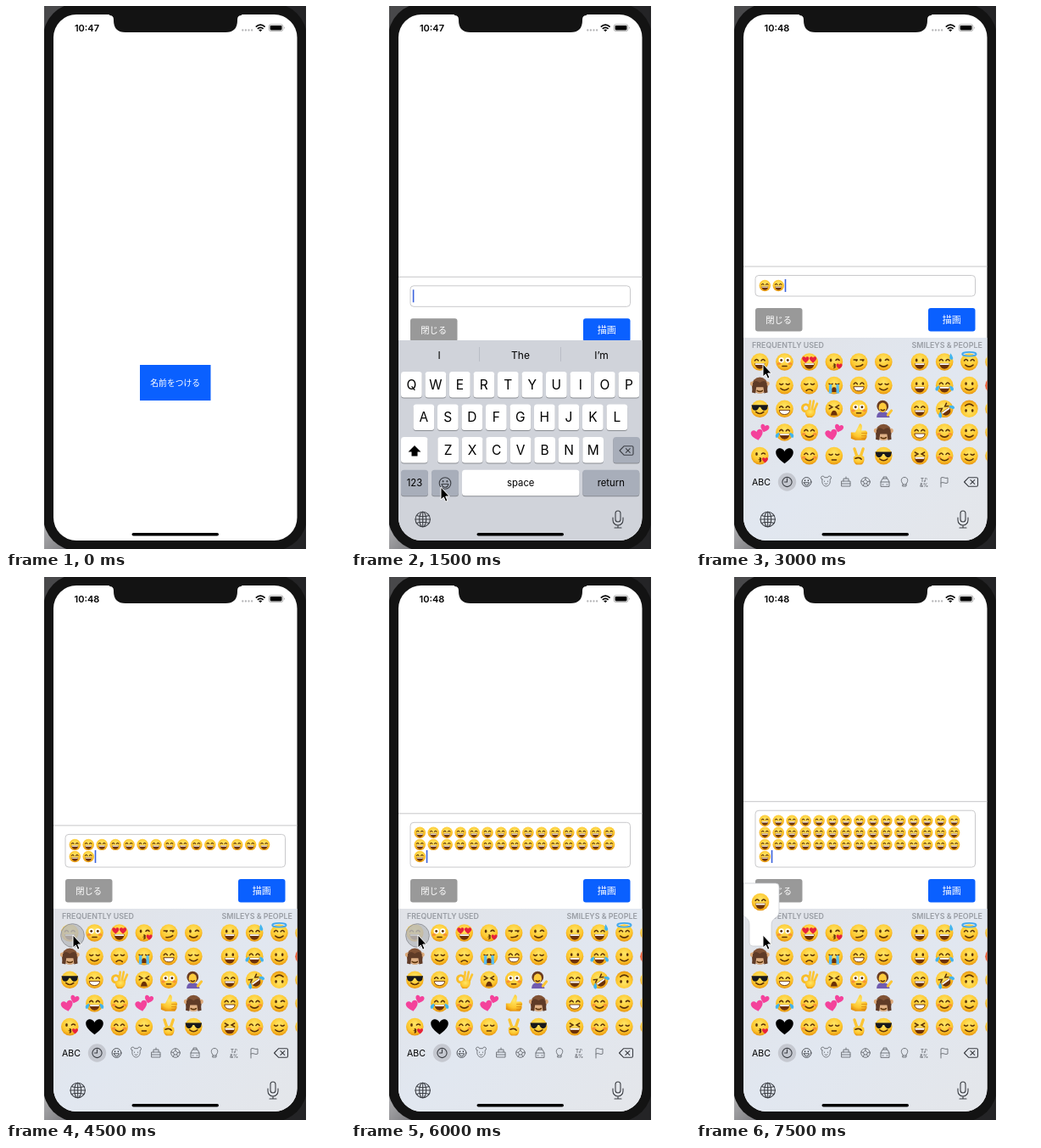
Write an HTML page that moves like this. It is 400 by 640 pixels and loops after 8000 ms.

```html
<!DOCTYPE html>
<html lang="ja">
<head>
<meta charset="utf-8">
<title>Emoji keyboard</title>
<style>
html, body { margin: 0; width: 100%; height: 100%; overflow: hidden; background: #fff; }
svg { display: block; width: 400px; height: 640px; }
text { font-family: Inter, "Noto Sans", sans-serif; text-anchor: middle; }
.jp { font-family: "Noto Sans CJK JP", "Noto Sans CJK", sans-serif; font-weight: 300; fill: #fff; }
.head { font-size: 8.9px; font-weight: 600; fill: #999da4; text-anchor: start; }
.line { fill: none; stroke: #3b3e44; stroke-linecap: round; stroke-linejoin: round; }
.eye { fill: #5b3208; }
.ink { fill: none; stroke: #5b3208; stroke-width: 1.5; stroke-linecap: round; }
</style>
</head>
<body>
<svg viewBox="0 0 400 640">
  <defs>
    <radialGradient id="skin" cx=".5" cy=".35" r=".68">
      <stop offset="0" stop-color="#ffe667"/><stop offset=".65" stop-color="#fdc62d"/><stop offset="1" stop-color="#e58f0c"/>
    </radialGradient>
    <linearGradient id="corner" x2="1" y2="1">
      <stop offset="0" stop-color="#b4b4b6"/><stop offset="1" stop-color="#77777b"/>
    </linearGradient>
    <linearGradient id="tray" x2="1" y2="1">
      <stop offset="0" stop-color="#e0e2e7"/><stop offset=".5" stop-color="#e1e7f0"/><stop offset="1" stop-color="#e4e6ea"/>
    </linearGradient>
    <clipPath id="screen"><rect x="56" y="10" width="287.5" height="620" rx="27"/></clipPath>
    <clipPath id="case"><rect x="45" width="309" height="640"/></clipPath>
    <g id="globe" class="line" stroke-width="1.1">
      <circle r="8.7"/><ellipse rx="4" ry="8.7"/><path d="M-8.7 0H8.7M0-8.7V8.7M-7.3-4.6Q0-1.8 7.3-4.6M-7.3 4.6Q0 1.8 7.3 4.6"/>
    </g>
    <g id="mic" class="line" stroke-width="1.1">
      <rect x="-3" y="-10" width="6" height="13" rx="3"/><path d="M-6-2V1A6 6 0 0 0 6 1V-2M0 7V10M-4 10H4"/>
    </g>
    <g id="erase" class="line" stroke-width="1.1">
      <path d="M-8 0L-3-5.2H6.5Q8-5.2 8-3.7V3.7Q8 5.2 6.5 5.2H-3ZM-.6-2.4L4.2 2.4M4.2-2.4L-.6 2.4"/>
    </g>
    <g id="smiley" class="line" stroke-width="1.1">
      <circle r="6.8"/><path d="M-4 1H4Q3 4.8 0 4.8T-4 1Z"/><path stroke-width="1.9" d="M-2.4-2.5v.6M2.4-2.5v.6"/>
    </g>
    <path id="heart" d="M0 9C-5 5-10 1-10-4-10-9-3-11 0-5 3-11 10-9 10-4 10 1 5 5 0 9Z"/>
    <g id="emojis"></g>
  </defs>

  <rect width="400" height="640" fill="#fff"/>
  <g clip-path="url(#case)">
    <rect x="45" width="309" height="640" fill="#242426"/>
    <rect x="45" width="30" height="40" fill="#48484a"/>
    <rect x="45" y="605" width="30" height="35" fill="url(#corner)"/>
    <rect x="44" y="-3" width="311" height="645" rx="40" fill="#131313"/>
  </g>
  <g clip-path="url(#screen)">
    <rect x="56" y="10" width="288" height="620" fill="#fff"/>
    <g id="start">
      <rect x="158" y="423" width="83.5" height="42" fill="#0a60ff"/>
      <text class="jp" x="199.7" y="447.6" font-size="9.8">名前をつける</text>
    </g>
    <g id="panel">
      <path id="rule" d="M56 0H344" stroke="#c6c6c8"/>
      <rect id="field" x="70" width="259.5" rx="4" fill="#fff" stroke="#c9c9cb"/>
      <g id="typed"></g>
      <rect id="caret" width="1.6" height="15" fill="#3a62dc"/>
      <g id="actions">
        <rect x="70" y="356" width="55.5" height="27.5" rx="3" fill="#999"/>
        <text class="jp" x="97.7" y="373.5" font-size="10.3">閉じる</text>
        <rect x="274" y="356" width="55.5" height="27.5" rx="3" fill="#0a60ff"/>
        <text class="jp" x="301.7" y="374" font-size="11">描画</text>
      </g>
    </g>
    <g id="letters">
      <rect x="56" y="394" width="288" height="236" fill="#d0d3da"/>
      <path d="M151.5 402V419M247.5 402V419" stroke="#b9bdc6"/>
      <g font-size="12"><text x="104" y="416">I</text><text x="200" y="416">The</text><text x="295.5" y="416">I’m</text></g>
      <g id="keys"></g>
      <path d="M75 518L82.5 525.5H78.5V530.5H71.5V525.5H67.5Z"/>
      <use href="#erase" x="325" y="524"/>
      <use href="#smiley" x="111" y="562.5"/>
    </g>
    <g id="emojiBoard">
      <rect x="56" y="391" width="288" height="239" fill="url(#tray)"/>
      <text class="head" x="66" y="403">FREQUENTLY USED</text>
      <text class="head" x="254.5" y="403">SMILEYS &amp; PEOPLE</text>
      <g id="grid"></g>
      <text x="77" y="564.5" font-size="10.6">ABC</text>
      <circle cx="107.5" cy="561" r="10.7" fill="#c5c8d0"/>
      <g class="line" stroke-width="1.1"><circle cx="107.5" cy="561" r="5.6"/><path d="M107.5 557V561H104.5"/></g>
      <g class="line" stroke-width=".9" style="stroke:#686b72">
        <use href="#smiley" transform="translate(130.5 561)scale(.8)"/>
        <path d="M149 558a2 2 0 1 1 2.5-2.3h4a2 2 0 1 1 2.5 2.3c1 4-1 8-4.500 8s-5.500-4-4.500-8M151.500 560v.5M155.500 560v.5M152 563q1.500 1 3 0"/>
        <path d="M172 566H182V560H172ZM172 563H182M174 560V557H180V560M177 557V555"/>
        <circle cx="200" cy="561" r="5.300"/><path d="M200 558.500L202.500 560.500 201.500 563H198.500L197.500 560.500ZM200 556V558.500M205 560L202.500 560.500M203 565.500L201.500 563M197 565.500L198.500 563M195 560L197.500 560.500"/>
        <path d="M218 566V561L220 557H226L228 561V566ZM218 561H228M220 564H221M225 564H226M221 557V555H225V557"/>
        <path d="M244 563C241 560 242 555.500 246 555.500S251 560 248 563V566H244ZM244 564H248"/>
        <path d="M289 567V556Q291 555 293 556T297 556V562Q295 563 293 562T289 562"/>
      </g>
      <g font-size="6" font-weight="600" fill="#686b72"><text x="269" y="560.500">T♪</text><text x="269" y="566.500">&amp;%</text></g>
      <use href="#erase" x="324.500" y="561"/>
    </g>
    <g id="tools"><use href="#globe" x="84.700" y="605"/><use href="#mic" x="315" y="605"/></g>
    <circle id="touch" cx="78.500" cy="422.500" r="13.800" fill="#babcc0" fill-opacity=".82" stroke="#96989d"/>
    <g id="popup">
      <path d="M56 361H94Q98 361 98 365V394C98 403 89 401 89 410V431Q89 435 85 435H67Q63 435 63 431V410C63 403 59 402 56 399Z" fill="#fff" stroke="#c3c6cc" stroke-width=".7"/>
      <use href="#laugh" transform="translate(76 383)scale(1.030)"/>
    </g>
  </g>

  <path d="M122 9H278V11Q273 11 273 16V17Q273 31 259 31H141Q127 31 127 17V16Q127 11 122 11Z" fill="#131313"/>
  <text id="clock" x="95.500" y="29.700" font-size="11" font-weight="600"></text>
  <path d="M279.300 28.500H291" stroke="#b4b4b6" stroke-width="2.300" stroke-linecap="round" stroke-dasharray="0 3.600"/>
  <g fill="none" stroke="#000" stroke-width="1.700"><path d="M294.800 24.600Q300.200 19.600 305.600 24.600M296.800 26.800Q300.200 23.800 303.600 26.800"/></g>
  <path d="M298.200 28.200Q300.200 26.600 302.200 28.200L300.200 30.200Z"/>
  <rect x="310.300" y="21.800" width="16.500" height="7.800" rx="2.200" fill="none" stroke="#999" stroke-width=".8"/>
  <rect x="311.600" y="23" width="13.900" height="5.400" rx="1.100"/>
  <path d="M328 24.300Q329.600 25.700 328 27.100Z" fill="#999"/>
  <rect x="148.500" y="621" width="102.500" height="3.500" rx="1.750"/>
  <path id="mouse" d="M0 0V15L3.300 11.900 5.600 17.200 8 16.200 5.700 11H10.200Z" stroke="#fff" stroke-width="1"/>
</svg>

<script>
const $ = id => document.getElementById(id);
const pair = f => f(-3.7) + f(3.7);
const ink = d => `<path class="ink" d="${d}"/>`;
const shape = (d, fill) => `<path d="${d}" fill="${fill}"/>`;

const eyes = {
  dot: pair(x => `<ellipse class="eye" cx="${x}" cy="-2" rx="1.300" ry="1.900"/>`),
  happy: pair(x => ink(`M${x - 2}-1.500q2-3 4 0`)),
  shut: pair(x => ink(`M${x - 2}-1.800q2 2 4 0`)),
  wide: pair(x => `<circle cx="${x}" cy="-2" r="3" fill="#fff"/><circle class="eye" cx="${x}" cy="-2" r="1.400"/>`),
  squint: ink('M-5.500-4L-2-2L-5.500 0M5.500-4L2-2L5.500 0'),
  wink: '<ellipse class="eye" cx="-3.700" cy="-2" rx="1.300" ry="1.900"/>' + ink('M2-2q2-2 4 0'),
  side: pair(x => ink(`M${x - 2}-2.500h4`) + `<circle class="eye" cx="${x + 1}" cy="-1.600" r="1.100"/>`),
  love: pair(x => `<use href="#heart" fill="#e6213b" transform="translate(${x * 1.15} -2.500)scale(.4)"/>`),
  shades: shape('M-9.500-4.500H9.500L8.500 0Q7.500 2 5 2T.800-2H-.800Q-2.500 2-5 2T-8.500 0Z', '#17181c')
};
const mouths = {
  open: shape('M-6 1.500H6Q5 8 0 8T-6 1.500Z', '#6b3109') + shape('M-5.500 1.700H5.500L5 3.500H-5Z', '#fff'),
  teeth: '<path d="M-6 1.500H6Q5.500 6.500 0 6.500T-6 1.500Z" fill="#fff" stroke="#6b3109" stroke-width=".9"/>',
  smile: ink('M-4.500 3.500Q0 7.500 4.500 3.500'),
  smirk: ink('M-3 5Q2 5.500 4.500 3'),
  flat: ink('M-2.500 4.800H2.500'),
  frown: ink('M-3.500 6Q0 3 3.500 6'),
  kiss: ink('M0 2.500q2.500 1 0 2q2.500 1 0 2.200') + '<use href="#heart" fill="#e6213b" transform="translate(6 5)scale(.34)"/>',
  wail: shape('M-3.800 7.500Q-3 2 0 2T3.800 7.500Z', '#6b3109')
};
const extras = {
  blush: pair(x => `<ellipse cx="${x * 1.7}" cy="2" rx="2.200" ry="1.500" fill="#f4743b" opacity=".65"/>`),
  tears: shape('M-6 0Q-12 2-10 6Q-6 7-6 0ZM6 0Q12 2 10 6Q6 7 6 0Z', '#42b5ee'),
  streams: shape('M-5.500-1H-2.500V9H-6ZM2.500-1H5.500L6 9H2.500Z', '#58bdf0'),
  sweat: shape('M7-10Q12-3 8-2.500Q4-3 7-10Z', '#42b5ee'),
  halo: '<ellipse cy="-9" rx="8" ry="2.300" fill="none" stroke="#42a8ed" stroke-width="1.700"/>'
};
const base = '<circle r="10" fill="url(#skin)"/>';
const face = (eye, mouth, extra) => base + eyes[eye] + mouths[mouth] + (extras[extra] || '');
const turn = (angle, body) => `<g transform="rotate(${angle})">${body}</g>`;

const emoji = {
  laugh: face('happy', 'open'), shock: face('wide', 'flat', 'blush'), love: face('love', 'open'),
  kiss: face('wink', 'kiss'), smirk: face('side', 'smirk'), wink: face('wink', 'smile'),
  grin: face('dot', 'open'), sweat: face('happy', 'open', 'sweat'), angel: face('happy', 'smile', 'halo'),
  calm: face('shut', 'smile'), sad: face('shut', 'frown'), cry: face('shut', 'wail', 'streams'),
  beam: face('happy', 'teeth'), joy: face('happy', 'open', 'tears'), plain: face('dot', 'smile'),
  rofl: turn(-35, face('squint', 'open', 'tears')), flip: turn(180, face('dot', 'smile')),
  weary: face('squint', 'wail'), cool: face('shades', 'smile'), blush: face('happy', 'smile', 'blush'),
  pensive: face('shut', 'flat'), giggle: face('squint', 'open'),
  mad: '<circle r="10" fill="#ec5428"/>',
  heart: '<use href="#heart" fill="#e3202f" transform="scale(1.080)"/>',
  hearts: '<g fill="#f4429b"><use href="#heart" transform="translate(-3 3)rotate(-12)scale(.68)"/><use href="#heart" transform="translate(5.500 -4.500)rotate(15)scale(.5)"/></g>',
  monkey: '<circle r="9.300" fill="#805235"/><circle cx="-8.500" cy="-2" r="2.600" fill="#dba878"/><circle cx="8.500" cy="-2" r="2.600" fill="#dba878"/><ellipse cy="5" rx="6" ry="4.500" fill="#deb086"/>' +
    shape('M-9 8L-8-3Q-5-7 0-3Q5-7 8-3L9 8L5 9L4 2H-4L-5 9Z', '#5f3b27') + ink('M-3 6Q0 8 3 6'),
  ok: '<circle cx="-4" cy="-1" r="4" fill="none" stroke="#f8bd28" stroke-width="2.800"/><path d="M0 1L1-9M3 1L5-9M5 3L9-6" stroke="#fbc534" stroke-width="2.600" stroke-linecap="round"/>' +
    shape('M-4 2L7 0Q8 7 3 10H-2Q-6 6-4 2Z', 'url(#skin)'),
  thumb: shape('M-9 0H-4L1-10Q5-10 3-2H8Q11 0 9 3Q10 6 7 9H-4L-9 7Z', 'url(#skin)') + '<path d="M3 1H9M3 4H8.500M3 7H7.500" stroke="#d98d14" stroke-width=".8"/>',
  peace: '<path d="M-2 1L-5-8M2 1L5-8" stroke="#fbc534" stroke-width="3.200" stroke-linecap="round"/>' + shape('M-6 1Q0-3 6 1Q7 8 3 10H-3Q-7 7-6 1Z', 'url(#skin)') + ink('M-4 3Q1 1 3 4'),
  desk: shape('M-8 10Q-8 3-1 3T7 10Z', '#6f5bb0') + '<circle cx="-1" cy="-3" r="6.700" fill="#6a3b20"/><ellipse cx="-1" cy="-1.500" rx="4.500" ry="5.500" fill="#fdcb3c"/><path d="M5 7L9 2" stroke="#fbc534" stroke-width="3" stroke-linecap="round"/>' + ink('M-3 1Q-1 2.500 1 1')
};
$('emojis').innerHTML = Object.entries(emoji).map(([id, body]) => `<g id="${id}">${body}</g>`).join('');
const put = (id, x, y, scale) => `<use href="#${id}" transform="translate(${x} ${y})scale(${scale})"/>`;

const rows = [
  'laugh shock love kiss smirk wink grin sweat angel plain',
  'monkey calm sad cry beam calm grin joy plain mad',
  'cool beam ok weary shock desk laugh rofl flip smirk',
  'hearts joy blush hearts thumb monkey beam blush wink kiss',
  'kiss heart blush pensive peace cool giggle blush calm kiss'
];
$('grid').innerHTML = rows.map((row, r) => row.split(' ').map((id, c) =>
  put(id, 75.300 + c * 29.200 + (c > 5 ? 13.500 : 0), 419.500 + r * 27.650, 1.030)).join('')).join('');

const key = (x, y, w, label = '', size = 15.500, fill = '#fff') =>
  `<rect x="${x}" y="${y + 1}" width="${w}" height="30.500" rx="3.500" fill="#898c92"/>
   <rect x="${x}" y="${y}" width="${w}" height="30.500" rx="3.500" fill="${fill}"/>
   <text x="${x + w / 2}" y="${y + 15.200 + size * .36}" font-size="${size}">${label}</text>`;
const keyRow = (letters, x, y) => [...letters].map((c, i) => key(x + i * 28.500, y, 24.700, c)).join('');
const gray = '#a8aeba';
$('keys').innerHTML = keyRow('QWERTYUIOP', 59, 431) + keyRow('ASDFGHJKL', 73.500, 469.500) + keyRow('ZXCVBNM', 102.300, 508) +
  key(59, 508, 31.500) + key(309.300, 508, 31.500, '', 15, gray) + key(59, 546.700, 32, '123', 11.300, gray) +
  key(95, 546.700, 32, '', 15, gray) + key(131, 546.700, 138.500, 'space', 11.300) + key(273.300, 546.700, 67, 'return', 11.300, gray);

const show = (id, on) => $(id).setAttribute('display', on ? 'inline' : 'none');
const set = (id, attrs) => Object.entries(attrs).forEach(([k, v]) => $(id).setAttribute(k, v));
const PER_ROW = 15, LINE = 14.100;

function draw(step) {
  const typing = step >= 2, board = step >= 4;
  const count = step < 6 ? 0 : Math.round(2 + (step - 6) * 4.900);
  const lines = Math.max(1, Math.ceil(count / PER_ROW));
  const grow = (lines - 1) * LINE, top = 317.500 - grow;

  show('start', !typing);
  show('panel', typing);
  show('tools', typing);
  show('letters', typing && !board);
  show('emojiBoard', board);
  show('popup', step === 15);
  show('touch', [7, 9, 11, 12, 14].includes(step));
  show('mouse', step > 0);
  $('clock').textContent = step < 5 ? '10:47' : '10:48';

  set('panel', { transform: `translate(0 ${board ? 0 : 12.300})` });
  set('rule', { transform: `translate(0 ${top - 10.500})` });
  set('field', { y: top, height: 24.500 + grow });
  set('caret', { x: 72.800 + (count - (lines - 1) * PER_ROW) * 15.950, y: 322 });
  $('typed').innerHTML = Array.from({ length: count }, (_, i) =>
    put('laugh', 81.300 + i % PER_ROW * 15.950, 329.500 - grow + Math.floor(i / PER_ROW) * LINE, .670)).join('');

  const [x, y] = step < 3 ? [203.500, 446] : step < 5 ? [106, 567] : [79, 422];
  set('mouse', { transform: `translate(${x} ${y})` });
}

const begin = performance.now();
let last = -1;
function tick() {
  const step = Math.floor((performance.now() - begin) % 8000 / 500);
  if (step !== last) draw(last = step);
  requestAnimationFrame(tick);
}
tick();
</script>
</body>
</html>
```
